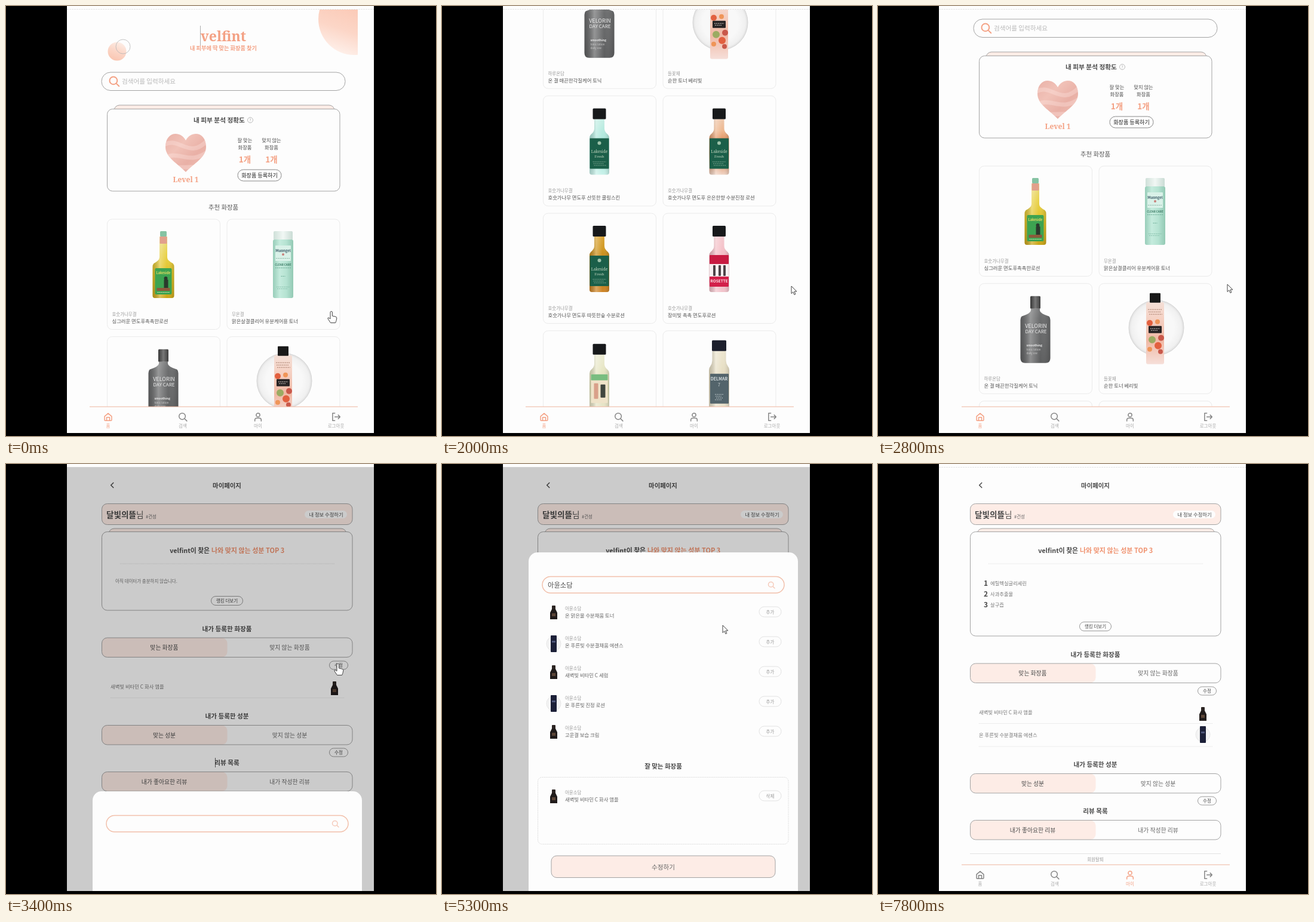
Animation of 720x720 px, one loop 8 s. Source, as an HTML page with a canvas:

```html
<!DOCTYPE html>
<html lang="ko">
<head>
<meta charset="utf-8">
<title>화장품 추천</title>
<style>
html, body { margin: 0; width: 100%; height: 100%; overflow: hidden; background: #000; }
canvas { display: block; width: 720px; height: 720px; }
</style>
</head>
<body>
<canvas id="stage" width="720" height="720"></canvas>
<script>
const c = document.getElementById('stage').getContext('2d');
const LOOP = 8000, STEP = 100;
const SANS = '"Noto Sans CJK KR", "Noto Sans CJK", "Noto Sans", sans-serif';
const SERIF = '"Noto Serif", serif';
const PEACH = '#f4a184', BLUSH = '#fdece6', PAPER = '#fdfdfd', EDGE = '#a3a3a3', INK = '#4a4a4a';
const BRAND = '아윤소담', SHOP = 'velfint';
const AMPOULE = '새벽빛 비타민 C 화사 앰플', ESSENCE = '온 푸른빛 수분결채움 에센스';

// ---- helpers ----
function text(s, x, y, size, color = INK, weight = 400, align = 'left', family = SANS) {
  c.font = `${weight} ${size}px ${family}`;
  c.textAlign = align;
  c.fillStyle = color;
  c.fillText(s, x, y);
}
const mid = (s, x, y, size, color, weight, family) => text(s, x, y, size, color, weight, 'center', family);

function box(x, y, w, h, r, fill, stroke, lw = 1) {
  c.beginPath();
  c.roundRect(x, y, w, h, r);
  if (fill) { c.fillStyle = fill; c.fill(); }
  if (stroke) { c.strokeStyle = stroke; c.lineWidth = lw; c.stroke(); }
}
function disc(x, y, r, fill, stroke, lw = 1) {
  c.beginPath();
  c.arc(x, y, r, 0, 7);
  if (fill) { c.fillStyle = fill; c.fill(); }
  if (stroke) { c.strokeStyle = stroke; c.lineWidth = lw; c.stroke(); }
}
function rule(x1, x2, y, color, dash = []) {
  c.setLineDash(dash);
  c.beginPath(); c.moveTo(x1, y); c.lineTo(x2, y);
  c.strokeStyle = color; c.lineWidth = 1; c.stroke();
  c.setLineDash([]);
}
function fade(x1, y1, x2, y2, ...colors) {
  const g = c.createLinearGradient(x1, y1, x2, y2);
  colors.forEach((k, i) => g.addColorStop(i / (colors.length - 1), k));
  return g;
}
function moved(dx, dy, draw) {
  c.save(); c.translate(dx, dy); draw(); c.restore();
}
// keys: [time, ...values], linear between them
function track(keys, t) {
  let i = keys.findIndex(k => k[0] > t);
  if (i < 0) return keys[keys.length - 1].slice(1);
  if (i === 0) return keys[0].slice(1);
  const a = keys[i - 1], b = keys[i], p = (t - a[0]) / (b[0] - a[0]);
  return a.slice(1).map((v, n) => v + (b[n + 1] - v) * p);
}

// ---- icons ----
const ICON = {
  home: new Path2D('M2.5 10.5 12 2.5l9.5 8V20a2 2 0 0 1-2 2h-15a2 2 0 0 1-2-2zM8 22v-9h8v9'),
  search: new Path2D('M19 10.5a8.5 8.5 0 1 1-17 0a8.5 8.5 0 1 1 17 0M16.8 16.8 23 23'),
  user: new Path2D('M17 7a5 5 0 1 1-10 0a5 5 0 1 1 10 0M3.5 23v-3a5 5 0 0 1 5-5h7a5 5 0 0 1 5 5v3'),
  exit: new Path2D('M9 2H3v20h6M9 12h14M18 7l5 5-5 5'),
  back: new Path2D('M15 5 8 12l7 7')
};
function icon(name, x, y, size, color, lw = 2) {
  const k = size / 24;
  c.save();
  c.translate(x - size / 2, y - size / 2);
  c.scale(k, k);
  c.lineWidth = lw / k; c.strokeStyle = color;
  c.lineCap = c.lineJoin = 'round';
  c.stroke(ICON[name]);
  c.restore();
}

function nav(active) {
  c.fillStyle = PAPER; c.fillRect(90, 671, 550, 45);
  rule(140, 589, 671, '#efb49d');
  [['home', '홈', 171], ['search', '검색', 296], ['user', '마이', 422], ['exit', '로그아웃', 552.5]].forEach(([k, s, x], i) => {
    icon(k, x, 688, 15, i === active ? PEACH : '#858585', 1.5);
    mid(s, x, 706, 7.5, i === active ? PEACH : '#aaa');
  });
}

// ---- bottles: x centre, y top ----
function vessel(x, y, o) {
  const { w, h, neck, cap, capW, capH, sh, color, r = 4 } = o;
  const n = neck / 2, b = w / 2;
  c.beginPath();
  c.moveTo(x - n, y + capH);
  c.lineTo(x - n, y + sh - 12);
  c.quadraticCurveTo(x - n, y + sh - 7, x - b + 2, y + sh - 2);
  c.quadraticCurveTo(x - b, y + sh, x - b, y + sh + 4);
  c.lineTo(x - b, y + h - r);
  c.quadraticCurveTo(x - b, y + h, x - b + r, y + h);
  c.lineTo(x + b - r, y + h);
  c.quadraticCurveTo(x + b, y + h, x + b, y + h - r);
  c.lineTo(x + b, y + sh + 4);
  c.quadraticCurveTo(x + b, y + sh, x + b - 2, y + sh - 2);
  c.quadraticCurveTo(x + n, y + sh - 7, x + n, y + sh - 12);
  c.lineTo(x + n, y + capH);
  c.closePath();
  c.fillStyle = fade(0, y, 0, y + h, ...color); c.fill();
  c.fillStyle = fade(x - b, 0, x + b, 0, 'rgba(0,0,0,.16)', 'rgba(255,255,255,.3)', 'rgba(255,255,255,0)', 'rgba(0,0,0,.16)');
  c.fill();
  box(x - capW / 2, y, capW, capH, 1.5, cap);
}
const specks = (x, y, w, n, color, gap = 3) => {
  for (let i = 0; i < n; i++) rule(x - w / 2 + i % 3, x + w / 2 - i % 2 * 3, y + i * gap + .5, color, [2, 1]);
};

function gold(x, y) {
  vessel(x, y, { w: 36, h: 112, neck: 13, cap: '#86c3a3', capW: 11, capH: 9, sh: 56, color: ['#eadf9c', '#e9d24a', '#dfbf22', '#c9a416'] });
  box(x - 6, y + 9, 12, 12, 1, '#e2a08c');
  box(x - 14, y + 62, 28, 44, 2, '#3da351');
  mid('Lakeside', x, y + 72, 5.5, '#e8dc62', 700);
  disc(x + 4, y + 79, 3, '#2a3a2c');
  box(x + 1, y + 81, 7, 16, 1, '#2a3a2c');
  box(x - 11, y + 95, 22, 5, 0, '#8c5a3c');
  specks(x, y + 102, 20, 1, '#d6e6b8');
}
function mint(x, y) {
  box(x - 16, y, 32, 15, 2, fade(x - 16, 0, x + 16, 0, '#cfe0d9', '#f1f7f4', '#cadcd5'));
  box(x - 17, y + 14, 34, 98, 3, fade(x - 17, 0, x + 17, 0, '#98cdb9', '#c5ebdd', '#b4e2d1', '#93c9b4'));
  box(x - 13, y + 24, 26, 26, 1, '#d9f1e8');
  mid('Muongel', x, y + 35, 6, '#3a5a66', 700);
  disc(x, y + 39, 2, '#c9827c');
  specks(x, y + 45, 24, 1, '#8fb8a8');
  mid('CLEAR CARE', x, y + 58, 4.6, '#3f7d68', 700);
  specks(x, y + 61, 26, 1, '#6fae98');
  specks(x, y + 75, 7, 1, '#6fae98');
  specks(x, y + 93, 22, 2, '#86c0ab');
}
function grey(x, y) {
  vessel(x, y, { w: 50, h: 112, neck: 15, cap: fade(x - 9, 0, x + 9, 0, '#333', '#777', '#3a3a3a'), capW: 17, capH: 21, sh: 36, color: ['#858687', '#6b6c6d', '#666768', '#5c5d5e'], r: 8 });
  mid('VELORIN', x + 1, y + 53, 9, '#eee');
  mid('DAY CARE', x + 1, y + 62, 8, '#eee');
  text('smoothing', x - 15, y + 84, 5, '#eee', 700);
  text('tonic lotion', x - 15, y + 91, 4.5, '#ccc');
  text('daily use', x - 15, y + 97, 4.5, '#ccc');
}
function berry(x, y) {
  const g = c.createRadialGradient(x + 2, y + 58, 30, x + 2, y + 58, 46);
  g.addColorStop(0, '#f8f8f8'); g.addColorStop(.75, '#f0f0f0'); g.addColorStop(1, '#dedede');
  disc(x + 2, y + 58, 46, g, '#d6d6d6');
  box(x - 15, y + 15, 30, 104, 3, fade(0, y, 0, y + 119, '#f3e6e0', '#f5d3c6', '#f0b8a4', '#f6dfd9'));
  box(x - 9, y, 18, 16, 1, '#191919');
  specks(x, y + 27, 24, 3, '#a77d6c', 4);
  [[-9, 50, 5], [4, 48, 4], [10, 75, 5], [-5, 78, 6], [5, 88, 6], [-9, 94, 4], [9, 98, 4]].forEach(([a, b, r], i) =>
    disc(x + a, y + b, r, ['#e2603f', '#ef9558', '#c9584a', '#9bab62'][i % 4]));
  box(x - 11, y + 55, 22, 12, 1, '#272324');
  specks(x, y + 59, 16, 2, '#d8cfca');
}
function mini(colors, label) {
  return (x, y) => {
    vessel(x, y, { w: 33, h: 111, neck: 17, cap: '#17191b', capW: 22, capH: 18, sh: 46, color: colors });
    label(x, y);
  };
}
const tag = (x, y) => {
  box(x - 16, y + 50, 32, 51, 1, '#1b5f49');
  disc(x, y + 58, 3, '#9dc2a9');
  mid('Lakeside', x, y + 75, 6.5, '#c4d7c0', 400, SERIF);
  mid('Fresh', x, y + 83, 6, '#c4d7c0', 400, SERIF);
  specks(x, y + 89, 22, 3, '#7da791');
};
const aqua = mini(['#d9f3ec', '#b7ebe0', '#a4e5d8', '#c8f2ea'], tag);
const orange = mini(['#efd7c6', '#eeb890', '#d4672a', '#f0d4c4'], tag);
const amber = mini(['#e2b04c', '#d29a24', '#b8750f', '#cf8526'], tag);
const pink = mini(['#f3cfd4', '#f5c3ca', '#f0b3bf', '#f2c5cc'], (x, y) => {
  box(x - 16, y + 49, 32, 15, 1, '#c81b42');
  box(x - 16, y + 64, 32, 21, 0, '#f6eff0');
  [-8, 1, 9].forEach(d => box(x + d - 2, y + 66, 4, 18, 1, '#4d4247'));
  box(x - 16, y + 85, 32, 17, 1, '#d2204a');
  mid('ROSETTE', x, y + 95, 6.5, '#fbe4e8', 700);
});
const cream = mini(['#eeeedc', '#e9e8c9', '#e0dfb4', '#e8e6cd'], (x, y) => {
  box(x - 14, y + 51, 28, 48, 1, '#efe3c9');
  box(x - 14, y + 51, 28, 10, 1, '#79bd80');
  box(x - 9, y + 66, 7, 26, 1, '#d9a08a');
  box(x + 2, y + 68, 8, 22, 1, '#40463f');
});
function slate(x, y) {
  vessel(x, y, { w: 34, h: 117, neck: 23, cap: '#1c1f2c', capW: 24, capH: 18, sh: 46, color: ['#efe9d6', '#e9e1c8', '#e2d9bc', '#eae3cf'] });
  box(x - 15, y + 56, 31, 50, 1, '#53646b');
  mid('DELMAR', x, y + 67, 7, '#d8dfe0', 700);
  mid('7', x, y + 77, 7, '#d8dfe0');
  specks(x, y + 90, 14, 4, '#b9c4c6');
}
function flask(x, y) {
  box(x - 3, y, 6, 7, 1, '#2c2523');
  c.beginPath();
  c.moveTo(x - 3, y + 6); c.lineTo(x - 6, y + 12); c.lineTo(x - 6, y + 23);
  c.lineTo(x + 6, y + 23); c.lineTo(x + 6, y + 12); c.lineTo(x + 3, y + 6);
  c.fillStyle = '#211c1b'; c.fill();
  box(x - 3, y + 13, 6, 5, 0, '#5b4537');
}
function tube(x, y) {
  disc(x, y + 14, 12, '#f4f4f4', '#e6e6e6');
  box(x - 5, y, 10, 28, 1, '#1c2038');
  box(x - 3, y + 9, 6, 3, 0, '#4d5578');
}

// ---- home ----
const GOODS = [
  [gold, 20, '호숫가나무결', '싱그러운 면도후촉촉한로션'], [mint, 20, '무온결', '맑은살결클리어 유분케어용 토너'],
  [grey, 21, '하루온담', '온 결 매끈한각질케어 토닉'], [berry, 16, '들꽃재', '순한 토너 베리빛'],
  [aqua, 21, '호숫가나무결', '호숫가나무 면도후 산뜻한 쿨링스킨'], [orange, 21, '호숫가나무결', '호숫가나무 면도후 은은한향 수분진정 로션'],
  [amber, 21, '호숫가나무결', '호숫가나무 면도후 따뜻한숲 수분로션'], [pink, 21, '호숫가나무결', '장미빛 촉촉 면도후로션'],
  [cream, 22, '호숫가나무결', '라임빛 면도후로션'], [slate, 16, '델마루', '데일리 수분 로션']
];
function heart() {
  c.save();
  c.beginPath();
  c.moveTo(301, 225);
  c.bezierCurveTo(292, 208, 267, 210, 267, 236);
  c.bezierCurveTo(267, 254, 288, 264, 301, 278);
  c.bezierCurveTo(314, 264, 335, 254, 335, 236);
  c.bezierCurveTo(335, 210, 310, 208, 301, 225);
  c.fillStyle = fade(270, 215, 330, 275, '#eab3a9', '#f1c2b8', '#e9b0a6', '#efbdb2');
  c.fill(); c.clip();
  c.lineWidth = 7; c.strokeStyle = 'rgba(255,236,230,.3)';
  for (let i = 0; i < 3; i++) {
    c.beginPath();
    c.moveTo(262, 234 + i * 22);
    c.bezierCurveTo(290, 214 + i * 24, 306, 262 + i * 8, 340, 222 + i * 20);
    c.stroke();
  }
  c.restore();
}
function home(caret) {
  disc(186, 76, 15.5, fade(192, 60, 180, 92, '#fdeee7', '#fbd6c7', '#f9c4af'));
  disc(196, 68, 12, null, '#b5b5b5', .8);
  c.save();
  c.beginPath(); c.rect(500, 6, 89, 90); c.clip();
  disc(583, 22, 60, fade(590, 6, 565, 82, '#fbcab7', '#fcd6c7', '#fef0ea'));
  c.restore();
  mid(SHOP, 364, 59, 23, PEACH, 900, SERIF);
  if (caret) box(325, 33, .8, 34, 0, '#999');
  mid('내 피부에 딱 맞는 화장품 찾기', 364, 74, 9.2, PEACH, 700);

  box(160, 111, 408, 30.5, 15, PAPER, EDGE);
  icon('search', 181, 126, 18, PEACH);
  text('검색어를 입력하세요', 194, 130, 10.6, '#b9b9b9');

  box(181, 166, 369, 30, 9, BLUSH, EDGE);
  box(169.5, 172.5, 389.5, 137.5, 9, PAPER, EDGE);
  text('내 피부 분석 정확도', 314, 195, 10.7, INK, 700);
  disc(409, 191, 4.5, null, '#aaa', .8);
  mid('?', 409, 194, 7, '#aaa');
  heart();
  mid('Level 1', 301, 295, 12, PEACH, 900, SERIF);
  [['잘 맞는', 400], ['맞지 않는', 444.5]].forEach(([s, x]) => {
    mid(s, x, 228, 8.3, INK, 500);
    mid('화장품', x, 240, 8.3, INK, 500);
    mid('1개', x, 262, 13.5, PEACH, 700);
  });
  box(388, 274, 73, 19, 9.5, PAPER, '#888');
  mid('화장품 등록하기', 424.5, 287, 9.1, '#222');

  mid('추천 화장품', 364, 341, 10.4, '#555');
  GOODS.forEach(([draw, dy, brand, name], i) => {
    const x = i % 2 ? 370 : 169.5, y = 357 + 196.7 * (i >> 1);
    box(x, y, 189, 184.5, 8, PAPER, '#ebebeb');
    draw(x + 94, y + dy);
    text(brand, x + 8, y + 162, 7.45, '#999');
    text(name, x + 8, y + 174, 8.35, '#555');
  });
}

// ---- my page ----
function tabs(y, a, b) {
  box(154.5, y, 419.5, 32.5, 9, PAPER);
  box(154.5, y, 210, 32.5, 9, BLUSH);
  box(154.5, y, 419.5, 32.5, 9, null, EDGE);
  mid(a, 259, y + 20, 9.8, INK, 500);
  mid(b, 469, y + 20, 9.8, '#666');
}
function pill(s, x, y, w, h = 14) {
  box(x - w / 2, y - h / 2, w, h, h / 2, PAPER, '#999');
  mid(s, x, y + 2.8, 7.5, INK, 500);
}
function myPage(fresh, caret) {
  const grow = fresh ? 43 : 0, more = fresh ? 81 : 0;
  icon('back', 172, 35.5, 14, INK, 1.5);
  mid('마이페이지', 364, 40, 10.4, INK, 700);
  box(154.5, 66.5, 419.5, 35, 9, BLUSH, EDGE);
  text('달빛의뜰', 162, 90, 13.6, INK, 700);
  text('님', 212, 90, 13.6, INK);
  text('#건성', 228, 91, 7.5, '#666');
  box(494, 78, 71, 13, 6.5, PAPER);
  mid('내 정보 수정하기', 530, 87.5, 8.3, INK, 500);

  box(166, 108, 398, 20, 9, BLUSH, EDGE);
  box(154.5, 113.5, 419.5, 131.5 + grow, 9, PAPER, EDGE);
  text(SHOP + '이 찾은', 335, 149, 10.8, INK, 700, 'right');
  text('나와 맞지 않는 성분 TOP 3', 338, 149, 11, '#f0926f', 700);
  rule(185, 545, 167, '#ddd', [1, 1]);
  if (fresh) {
    ['에틸헥실글리세린', '사과추출물', '살구즙'].forEach((s, i) => {
      text(i + 1, 177, 204 + i * 18, 12, INK, 700);
      text(s, 188, 203 + i * 18, 8.3, '#777');
    });
  } else text('아직 데이터가 충분하지 않습니다.', 177, 199, 7.5, '#777');
  pill('랭킹 더보기', 364, 229 + grow, 53, 15);

  moved(0, grow, () => {
    mid('내가 등록한 화장품', 364, 280, 10.6, INK, 700);
    tabs(291, '맞는 화장품', '맞지 않는 화장품');
    pill('수정', 551, 337, 31);
    text(AMPOULE, 169, 376, 8.35, '#777');
    flask(544, 364);
    rule(169, 560, 391.5, '#ddd', [1, 1]);
    if (fresh) {
      text(ESSENCE, 169, 414, 8.35, '#777');
      tube(544, 396);
      rule(169, 560, 430, '#ddd', [1, 1]);
    }
  });
  moved(0, more, () => {
    mid('내가 등록한 성분', 364, 426, 10.6, INK, 700);
    tabs(437.5, '맞는 성분', '맞지 않는 성분');
    pill('수정', 551, 483, 31);
    mid('리뷰 목록', 364, 504, 10.6, INK, 700);
    if (caret) box(344, 492, .8, 16, 0, '#333');
    tabs(515.5, '내가 좋아요한 리뷰', '내가 작성한 리뷰');
    rule(154, 574, 571.5, '#e2e2e2');
    mid('회원탈퇴', 364, 584, 7.5, '#999');
  });
}

// ---- registration sheet ----
const TYPED = ['ㅇ', '아', '아ㅇ', '아유', '아윤', '아윤ㅅ', '아윤소', '아윤솓', '아윤소다', '아윤소담'];
const FOUND = ['온 맑은물 수분채움 토너', ESSENCE, '새벽빛 비타민 C 세럼', '온 푸른빛 진정 로션', '고운결 보습 크림'];

function item(y, name, draw, action) {
  draw(187, y - 11);
  text(BRAND, 206, y - 3, 7.45, '#999');
  text(name, 206, y + 9, 8.35, '#666');
  box(531, y - 9, 37, 17, 8.5, PAPER, '#e2e2e2');
  mid(action, 549.5, y + 2.5, 7.5, '#999');
}
function sheet(t) {
  const added = t >= 5900;
  box(145, 148, 451, 600, 15, PAPER);
  box(168, 188.5, 405, 27.5, 14, PAPER, '#f2c0ab', 1.5);
  icon('search', 551.5, 202.5, 12, '#f5cbbb', 1.5);
  const n = Math.min(Math.floor((t - 3860) / 75), TYPED.length - 1);
  if (n >= 0 && !added) {
    const s = TYPED[n];
    text(s, 177, 207, 11.3, INK);
    const w = c.measureText(s).width, last = c.measureText(s.slice(-1)).width;
    if (t < 4700) {
      box(177 + w - last, 209, last, .9, 0, INK);
      box(177 + w, 197, .8, 12, 0, INK);
    }
  }
  if (t >= 4700 && !added) FOUND.forEach((s, i) => item(248 + i * 50, s, i % 2 ? tube : flask, '추가'));
  mid('잘 맞는 화장품', 370.5, 510, 10.5, INK, 700);
  c.setLineDash([2, 1]);
  box(160.5, 524.5, 419.5, 112, 7, PAPER, '#dedede');
  c.setLineDash([]);
  item(556, AMPOULE, flask, '삭제');
  if (added) item(594, ESSENCE, tube, '삭제');
  box(183, 656, 375, 36.5, 9, BLUSH, EDGE);
  mid('수정하기', 370.5, 679, 10.6, '#666');
}
function notice(t) {
  c.save();
  c.shadowColor = 'rgba(0,0,0,.12)'; c.shadowBlur = 4;
  box(262, 301, 217, 120, 5, '#f9fcff');
  c.restore();
  if (t >= 6600) mid('수정되었습니다.', 370.5, 365, 11, INK, 500);
}

// ---- pointer ----
const PATH = [
  [0, 545, 512], [300, 545, 512], [900, 580, 476], [1400, 582, 474], [2000, 585, 469], [2800, 585, 466],
  [3000, 424, 686], [3100, 424, 686], [3300, 553, 335], [3400, 556, 335], [3800, 330, 222], [4200, 319, 215],
  [4700, 319, 215], [5300, 470, 270], [5600, 550, 296], [5900, 550, 296], [6100, 420, 674], [6400, 424, 668],
  [6600, 424, 668], [7000, 424, 722]
];
const HAND = new Path2D('M-2 1a1.7 1.7 0 0 1 3.4 0v6l5.6 1.2q2 .6 1.8 2.8l-1 4.5-1.2 3H-1.500l-4.300-6.500q-1-2 .8-2.200l3 2z');
const ARROW = new Path2D('M0 0v12.500l2.900-2.700 2 4.600 2-.9-2-4.500h4z');
const BEAM = new Path2D('M-3-6.500h6M0-6.500v13M-3 6.500h6');
function pointer(t) {
  const [x, y] = track(PATH, t);
  const on = (a, b) => t >= a && t < b;
  moved(x, y, () => {
    c.lineWidth = 1; c.strokeStyle = '#444'; c.lineJoin = 'round';
    if (on(3700, 5000)) return c.stroke(BEAM);
    const hand = on(0, 600) || on(3000, 3200) || on(3300, 3500) || on(5500, 6000) || on(6100, 6200);
    const shape = hand ? HAND : ARROW;
    c.fillStyle = '#fff';
    c.fill(shape); c.stroke(shape);
  });
}

// ---- scene ----
const SCROLL = [[1100, 0], [1400, 62], [1600, 210], [1800, 410], [2000, 600], [2100, 645], [2200, 640], [2400, 470], [2600, 270], [2800, 89], [2900, 20], [3000, 0]];
const SHEET = [[3300, 570], [3400, 400], [3500, 100], [3600, 0], [6100, 0], [6200, 330], [6300, 570]];

function draw(t) {
  const caret = Math.floor(t / 500) % 2 === 0;
  const mine = t >= 3100, dim = t >= 3400 && t < 7100;
  c.fillStyle = '#000'; c.fillRect(0, 0, 720, 720);
  c.save();
  c.beginPath(); c.rect(102, 0, 514, 715); c.clip();
  c.fillStyle = PAPER; c.fillRect(102, 0, 514, 715);
  c.save();
  c.beginPath(); c.rect(102, 6, 514, 709); c.clip();
  // the page recentres while its scrollbar is hidden
  moved(dim ? 6 : 0, 0, () => {
    if (mine) myPage(t >= 7100, caret);
    else moved(0, -track(SCROLL, t)[0], () => home(caret));
    nav(mine ? 2 : 0);
  });
  if (dim) {
    c.fillStyle = 'rgba(0,0,0,.2)'; c.fillRect(102, 5, 514, 710);
    const drop = track(SHEET, t)[0];
    if (drop < 570) moved(0, drop, () => sheet(t));
    if (t >= 6300) notice(t);
  }
  c.restore();
  rule(102, 616, 5.5, dim ? '#d0d0d0' : '#e4e4e4', dim ? [] : [3, 1]);
  pointer(t);
  c.restore();
}

// the picture advances ten times a second
const start = performance.now();
function frame() {
  const t = (performance.now() - start) % LOOP;
  draw(Math.floor(t / STEP) * STEP);
  requestAnimationFrame(frame);
}
frame();
</script>
</body>
</html>
```
